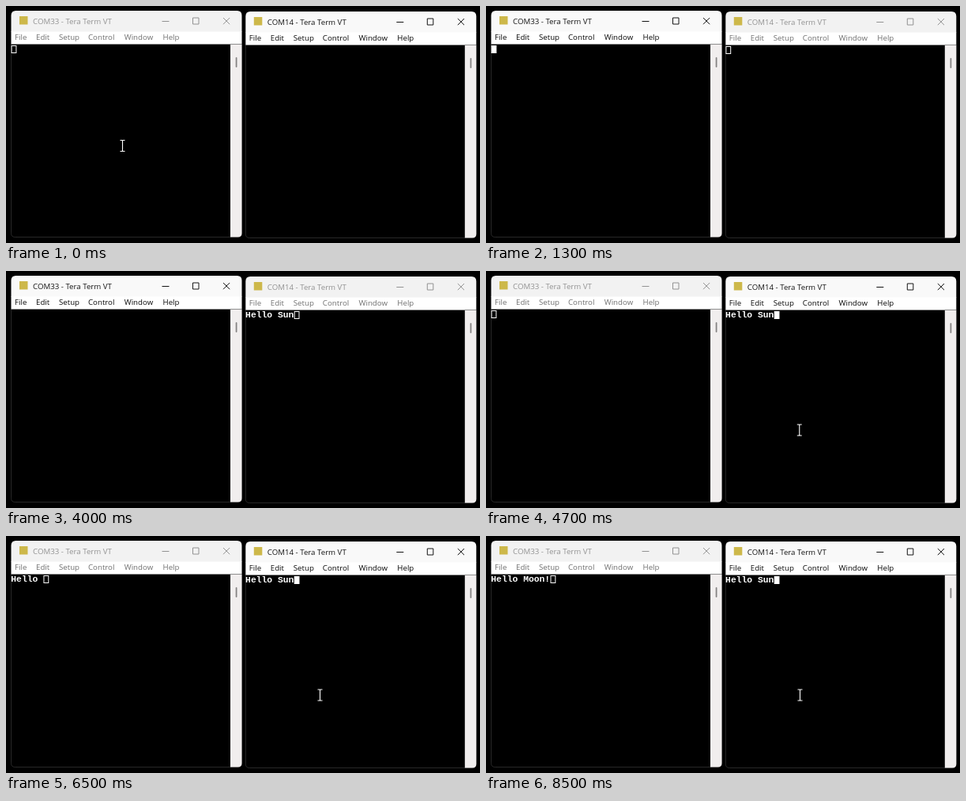
Recreate the animation shown at these times as an HTML page. Size 600 px wide and 301 px high, loop 8.6 s.

```html
<!DOCTYPE html>
<html lang="en">
<head>
<meta charset="utf-8">
<style>
  html, body { margin: 0; width: 100%; height: 100%; overflow: hidden; background: #000; }
  svg { display: block; width: 600px; height: 301px; }
  text { white-space: pre; }
  .ui { font: 9.7px "Open Sans", "Noto Sans", sans-serif; }
  .term { font: bold 11.35px "Liberation Mono", monospace; fill: #fff; }
  .ctl { fill: none; }
</style>
</head>
<body>
<svg id="stage" viewBox="0 0 600 301"></svg>
<script>
const LOOP = 8600, FRAME = 100, FADE = 200, CELL = 6.81;
const CLICK_LEFT = 100, CLICK_RIGHT = 4300;
const MENU = { File: 11, Edit: 38, Setup: 67, Control: 104, Window: 149.7, Help: 198.5 };

const panes = [
  { x: 0, y: 0, bottom: 293.5, title: "COM33 - Tera Term VT", text: "Hello Moon!",
    keys: [5700, 5800, 6000, 6100, 6300, 6500, 6900, 7400, 7700, 7900, 8200],
    blinks: [700, 1300, 1800, 2400, 2900, 3500, 4000] },
  { x: 296.8, y: 1, bottom: 293.5, title: "COM14 - Tera Term VT", text: "Hello Sun",
    keys: [1700, 2000, 2100, 2200, 2400, 2600, 2700, 3200, 3300],
    blinks: [4800, 5400, 5900, 6500, 6900, 7400, 7900, 8500] }
];

const paneMarkup = p => `
  <g transform="translate(${p.x} ${p.y})">
    <path d="M6.5 48V${p.bottom - 5}q0 5 5 5H293.5q5 0 5-5V48" fill="#000" stroke="#333" stroke-width=".8"/>
    <path class="bar" d="M6.5 33V12q0-6 6-6H292.5q6 0 6 6V33Z"/>
    <rect x="6.5" y="32.5" width="292" height="15.5" fill="#fff"/>
    <rect x="6.5" y="48" width="292" height="1" fill="#8c8c8c"/>
    <path d="M284 49H298.5V${p.bottom - 5}q0 5-5 5H284Z" fill="#f1eeee"/>
    <rect x="290.7" y="65" width="1.8" height="13" rx=".9" fill="#858383"/>
    <rect x="17" y="13" width="10.5" height="10.5" fill="#cdb84a"/>
    <text class="ui caption" x="34" y="22.8">${p.title}</text>
    <path class="ctl" d="M197.5 19.5h9M236.5 15h7.5v8h-7.5zM275 15l8.2 8.2M283.2 15l-8.2 8.2"/>
    <g class="ui menu">${Object.entries(MENU).map(([s, x]) => `<text x="${x}" y="43.2">${s}</text>`).join("")}</g>
    <text class="term" x="6.3" y="58.4"></text>
    <rect class="caret" y="50.5" width="5.8" height="9" stroke="#fff"/>
  </g>`;

const stage = document.getElementById("stage");
stage.innerHTML = panes.map(paneMarkup).join("") + `
  <g id="beam" fill="none">
    <path d="M-3-7h2.4L0-6.3L.6-7H3M0-6.5V6.5M-3 7h2.4L0 6.3L.6 7H3" stroke="#fff" stroke-width="1.1"/>
  </g>`;

const beam = document.getElementById("beam");
[...stage.children].slice(0, 2).forEach((g, i) => {
  for (const name of ["bar", "caption", "ctl", "menu", "term", "caret"])
    panes[i][name] = g.querySelector("." + name);
});

const clamp = v => Math.max(0, Math.min(1, v));
const mix = (a, b, k) => a + (b - a) * k;
const gray = (a, b, k) => { const v = Math.round(mix(a, b, k)); return `rgb(${v},${v},${v})`; };
const passed = (times, t) => times.filter(s => s <= t).length;

function drawPane(p, t, focus, active, lit) {
  p.bar.style.fill = gray(242, 249, focus);
  p.caption.style.fill = gray(146, 20, focus);
  p.ctl.style.stroke = gray(146, 20, focus);
  p.menu.style.fill = gray(112, 10, focus);
  const n = passed(p.keys, t);
  p.term.textContent = p.text.slice(0, n);
  p.caret.setAttribute("x", 7.1 + n * CELL);
  p.caret.style.fill = active ? "#fff" : "none";
  p.caret.style.display = !active || lit ? "" : "none";
}

function drawBeam(t) {
  const k = 1 - (1 - clamp((t - 4100) / 700)) ** 3;
  beam.style.display = t < 300 || t >= 4200 ? "" : "none";
  beam.setAttribute("transform", `translate(${mix(147.5, 397.5, k)} ${mix(177.5, 202, k)})`);
}

function draw(now) {
  const t = Math.floor(now % LOOP / FRAME) * FRAME;
  const leftFocus = clamp((t - CLICK_LEFT) / FADE) - clamp((t - CLICK_RIGHT) / FADE);
  const leftActive = t >= CLICK_LEFT && t < CLICK_RIGHT;
  const [left, right] = panes;
  drawPane(left, t, leftFocus, leftActive, passed(left.blinks, t) % 2 === 0);
  drawPane(right, t, 1 - leftFocus, !leftActive,
    t >= CLICK_RIGHT && passed(right.blinks, t) % 2 === 0);
  drawBeam(t);
}

const start = performance.now();
function tick() {
  draw(performance.now() - start);
  requestAnimationFrame(tick);
}
tick();
</script>
</body>
</html>
```
